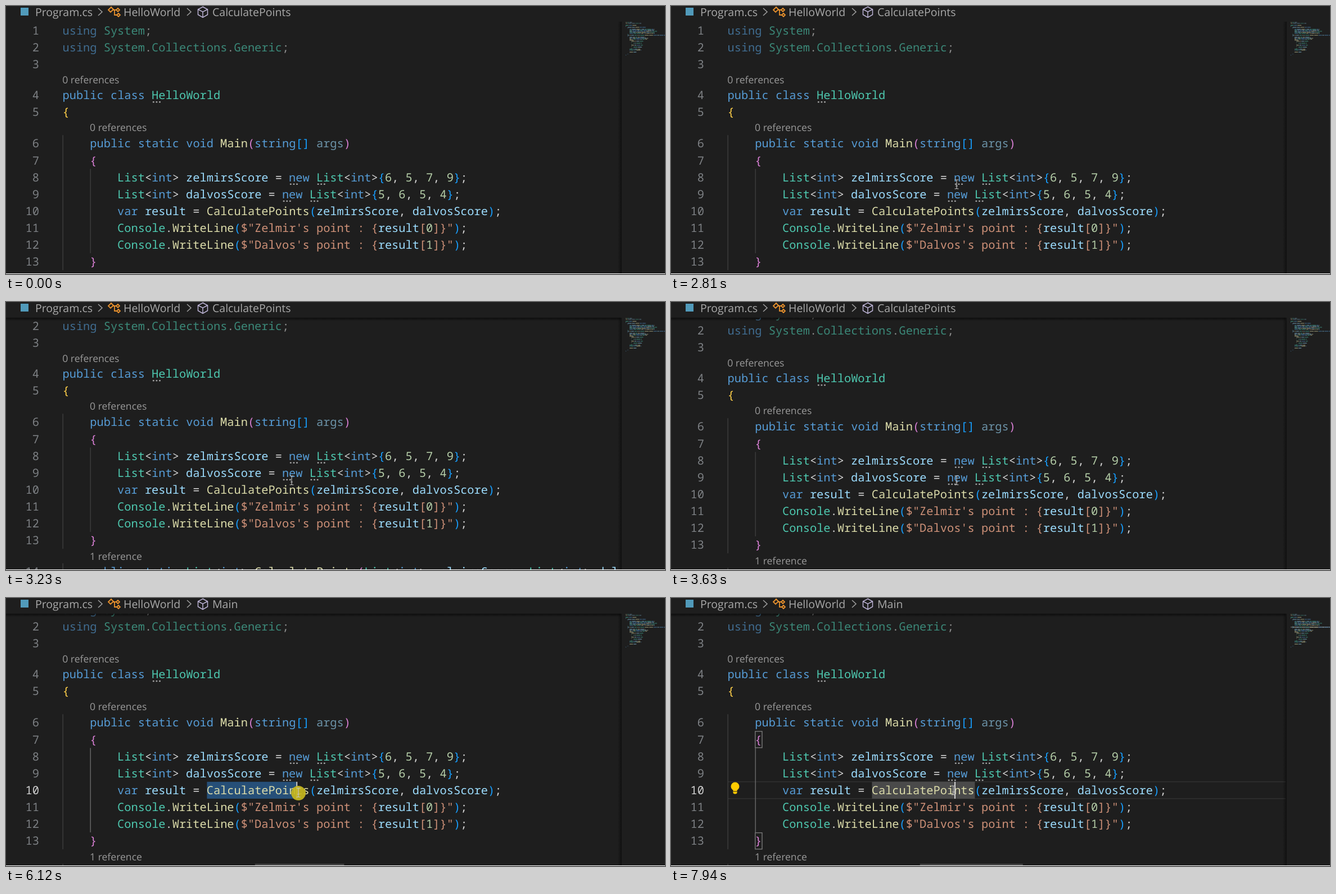
Recreate the animation shown at these times as an HTML page. Size 1172x478 px, loop 8000 ms.

```html
<!DOCTYPE html>
<html lang="en">
<head>
<meta charset="utf-8">
<title>Code editor</title>
<style>
html, body { margin: 0; width: 100%; height: 100%; overflow: hidden; background: #1e1e1e; }
svg { display: block; width: 1172px; height: 478px; }
text { white-space: pre; text-rendering: geometricPrecision; }
.code { font: 20.35px "Noto Sans Mono", monospace; }
.lens { font: 17.6px "Open Sans", sans-serif; fill: #999; }
.crumb { font: 19.5px "Open Sans", sans-serif; fill: #a9a9a9; }
</style>
</head>
<body>
<svg id="stage" viewBox="0 0 1172 478">
  <defs>
    <clipPath id="pane"><rect y="28" width="1093" height="449"/></clipPath>
    <linearGradient id="down" x2="0" y2="1"><stop stop-color="#000" stop-opacity=".55"/><stop offset="1" stop-color="#000" stop-opacity="0"/></linearGradient>
    <linearGradient id="side"><stop stop-color="#000" stop-opacity="0"/><stop offset="1" stop-color="#000" stop-opacity=".45"/></linearGradient>
  </defs>
  <rect width="1172" height="478" fill="#1e1e1e"/>
  <g clip-path="url(#pane)">
    <g id="doc"><g id="back"></g><g id="lines"></g><g id="front"></g></g>
    <rect id="topShade" y="28" width="1093" height="6" fill="url(#down)"/>
  </g>
  <rect x="1088" y="28" width="7" height="449" fill="url(#side)"/>
  <g id="map"></g>
  <g id="crumbs" fill="none" stroke-width="1.5">
    <rect x="26" y="3" width="14" height="14" fill="#519aba"/>
    <path d="M164 4l7 6.5l-7 6.5M322 4l7 6.5l-7 6.5" stroke="#a0a0a0"/>
    <path d="M182 7l5-5 4 4-5 5zM190 7h6M193 7v9h4M196 7l3-3 3 3-3 3zM197 16l3-3 3 3-3 3z" stroke="#e8912d" stroke-width="1.8"/>
    <path d="M350 1.5l8.5 4.5v9.5l-8.5 5-8.5-5V6zM341.5 6l8.5 4.5 8.5-4.5M350 10.5v10" stroke="#bdb4d6"/>
    <text class="crumb" x="52" y="18.3">Program.cs</text>
    <text class="crumb" x="209" y="18.3">HelloWorld</text>
    <text class="crumb" x="367" y="18.3" id="member"></text>
  </g>
  <g id="bulb"><circle cx="114" cy="336" r="7.5" fill="#ffcc00"/><path d="M110.500 341h7v7q-3.500 3-7 0z" fill="#ffcc00"/><path d="M110.500 345h7" stroke="#1e1e1e"/></g>
  <circle id="press" r="13" fill="#c8b81e" fill-opacity=".92"/>
  <path id="beam" d="M-3.500-8h2.500l1 1 1-1h2.500M0-7V7M-3.500 8h2.500l1-1 1 1h2.500M-2 3h4" fill="none" stroke="#c4c4c4" stroke-width="1.100"/>
  <rect y="477" width="1172" height="1" fill="#fff"/>
</svg>
<script>
const $ = id => document.getElementById(id);
const ADV = 12.2, TEXT_X = 100.5, CELL_X = 101.2, ROW = 30.15, LOOP = 8000;
const colX = c => CELL_X + c * ADV;
const midY = n => n < 4 ? 43.3 + ROW * (n - 1) : n < 6 ? 159 + ROW * (n - 4) : n < 14 ? 245.2 + ROW * (n - 6) : 512;

function add(parent, tag, attrs, text) {
  const el = document.createElementNS('http://www.w3.org/2000/svg', tag);
  for (const k in attrs) el.setAttribute(k, attrs[k]);
  if (text) el.textContent = text;
  parent.appendChild(el);
  return el;
}
const set = (el, attrs) => { for (const k in attrs) el.setAttribute(k, attrs[k]); };
const show = (el, on) => el.setAttribute('visibility', on ? 'visible' : 'hidden');

// Upper-case keys are the faded variant of the same colour.
const colors = { b: '#569cd6', t: '#4ec9b0', w: '#d4d4d4', y: '#dcdcaa', v: '#9cdcfe',
  s: '#ce9178', n: '#b5cea8', g: '#ffd04a', p: '#da80d6', c: '#179fff' };
const list = '§tList§w<§bint§w>';
const declare = (name, nums) => `${list} §v${name} §w= §bnew ${list}§c{` +
  nums.map(n => '§n' + n).join('§w, ') + '§c}§w;';
const print = (name, i) => `§tConsole§w.§yWriteLine§c(§s$"${name}'s point : {§vresult§s[§n${i}§s]}"§c)§w;`;
const code = [
  [0, '§Busing §TSystem§W;'],
  [0, '§Busing §TSystem§W.§TCollections§W.§TGeneric§W;'],
  [0, ''],
  [0, '§bpublic class §tHelloWorld'],
  [0, '§g{'],
  [4, '§bpublic static void §yMain§p(§bstring§c[] §Vargs§p)'],
  [4, '§p{'],
  [8, declare('zelmirsScore', [6, 5, 7, 9])],
  [8, declare('dalvosScore', [5, 6, 5, 4])],
  [8, '§bvar §vresult §w= §yCalculatePoints§c(§vzelmirsScore§w, §vdalvosScore§c)§w;'],
  [8, print('Zelmir', 0)],
  [8, print('Dalvos', 1)],
  [4, '§p}'],
  [4, `§bpublic static ${list} §yCalculatePoints§p(${list} §vzelmirsScore§w, ${list} §vdalvosScore§p)`]
];

const back = $('back'), lines = $('lines'), front = $('front');
const rowBox = (n, c, len, fill) => add(back, 'rect',
  { x: colX(c), y: midY(n) - 15, width: len * ADV, height: ROW, fill });

const rowEdge = add(back, 'path', { d: `M101 ${midY(10) - 15}H1093M101 ${midY(10) + 15}H1093`,
  stroke: '#303030', 'stroke-width': 1.5 });
const pick = rowBox(10, 21, 0, '#264f78');
const twin = rowBox(14, 28, 0, '#484848');
const guide = (x, a, b) => add(back, 'path', { d: `M${x} ${midY(a) - 15}V${midY(b) + 15}`,
  stroke: '#404040', 'stroke-width': 1.3 });
guide(101.2, 6, 13);
guide(101.2, 14, 14);
const scope = guide(150.2, 8, 12);

const numbers = code.map(([indent, src], i) => {
  const y = midY(i + 1) + 7.2;
  let col = indent;
  for (const part of src.split('§').slice(1)) {
    const key = part[0], low = key.toLowerCase(), text = part.slice(1);
    add(lines, 'text', { class: 'code', x: TEXT_X + col * ADV, y, fill: colors[low],
      'fill-opacity': key === low ? 1 : .62 }, text);
    col += text.length;
  }
  return add(lines, 'text', { class: 'code', x: 59, y, 'text-anchor': 'end', fill: '#7d8084' }, String(i + 1));
});
[[0, 131.5, '0 references'], [4, 217, '0 references'], [4, 484.5, '1 reference']].forEach(([c, y, s]) =>
  add(lines, 'text', { class: 'lens', x: TEXT_X - .3 + c * ADV, y: y + 6.3 }, s));
[[4, 13], [8, 33], [8, 37], [9, 32], [9, 36]].forEach(([n, c]) => {
  for (let i = 0; i < 3; i++)
    add(lines, 'rect', { x: colX(c) + 1 + i * 5.6, y: midY(n) + 11, width: 3, height: 2.6, rx: 1, fill: '#a2a2a2' });
});

const pairBox = (n, c) => add(front, 'rect', { x: colX(c) - .2, y: midY(n) - 14.5, width: ADV, height: ROW - 1,
  fill: 'none', stroke: '#888', 'stroke-width': 1.2 });
const parens = [pairBox(10, 36), pairBox(10, 62)];
const braces = [pairBox(7, 4), pairBox(13, 4)];
const caret = add(front, 'rect', { y: midY(10) - 15, width: 2, height: ROW, fill: '#d0d0d0' });

// Overview strip: tiny dashes, [line, indent, length] for the part below the visible code.
const map = $('map');
const mapMark = add(map, 'rect', { x: 1102, y: 51, width: 70, height: 1.8, fill: '#575757' });
let seed = 7;
const rnd = () => (seed = seed * 16807 % 2147483647) / 2147483647;
const rows = code.map(([d, s], i) => [i + 1, d, s.replace(/§./g, '').length]);
rows.push([15, 4, 1], [16, 8, 32], [17, 8, 38], [18, 8, 36], [19, 8, 8], [20, 12, 24], [21, 12, 1],
  [22, 16, 17], [23, 12, 1], [24, 12, 24], [25, 12, 1], [26, 16, 17], [27, 12, 1], [28, 8, 23],
  [29, 8, 24], [31, 8, 14], [33, 4, 1], [34, 0, 1]);
const tints = ['#4ec9b0', '#569cd6', '#9cdcfe', '#dcdcaa'];
for (const [n, d, len] of rows) {
  for (let c = 0; c < len;) {
    const w = Math.min(len - c, 2 + Math.floor(rnd() * 7)), x = 1102 + (d + c) * .87;
    if (x < 1172) add(map, 'rect', { x, y: 28.6 + (n - 1) * 1.77, width: Math.min(w * .87, 1172 - x),
      height: 1.1, fill: tints[Math.floor(rnd() * 4)], opacity: n < 3 ? .4 : .6 });
    c += w + 1;
  }
}

// Pointer moves: start, end, number of steps, target x, target y.
const moves = [
  [530, 530, 1, 1046, 462], [600, 600, 1, 820, 352], [660, 660, 1, 732, 340], [730, 730, 1, 811, 421],
  [1790, 2410, 10, 508, 318],
  [4350, 4620, 5, 538, 353], [4690, 5110, 7, 371, 343],
  [5180, 5460, 5, 360, 343],
  [5800, 6120, 5, 520, 347], [6190, 6460, 5, 537, 346],
  [6870, 7130, 5, 510, 345], [7400, 7540, 3, 502, 343]
];
const scrolls = [[3030, 12], [3100, 23], [3170, 28], [3230, 31], [3500, 29], [3570, 25], [3630, 23]];

function stepped(t, a, b, n) {
  if (t >= b) return 1;
  return (Math.floor((t - a) / (b - a) * (n - 1) + .1) + 1) / n;
}
function pointer(t) {
  let x = 1046, y = 462;
  for (const [a, b, n, tx, ty] of moves) {
    if (t < a) break;
    const p = stepped(t, a, b, n), k = p * p * (3 - 2 * p);
    x += (tx - x) * k;
    y += (ty - y) * k;
  }
  return [x, y];
}

function draw(t) {
  const [x, y] = pointer(t);
  const scroll = scrolls.reduce((s, [at, v]) => t >= at ? v : s, 0);
  const active = t >= 5660, clicked = t >= 7330;
  const end = clicked ? 36 : active ? Math.max(21, Math.min(36, Math.round((pointer(Math.min(t, 6530))[0] - CELL_X) / ADV))) : 21;

  set($('doc'), { transform: `translate(0 ${-scroll})` });
  show($('topShade'), scroll > 0);
  $('member').textContent = active ? 'Main' : 'CalculatePoints';
  set(numbers[9], { fill: active ? '#d0d0d0' : '#7d8084' });
  set(scope, { stroke: active ? '#707070' : '#404040' });

  const width = (end - 21) * ADV;
  set(pick, { width, fill: clicked ? '#4a4a4a' : '#264f78' });
  set(twin, { width });
  set(caret, { x: colX(clicked ? 33 : end) + .2 });
  show(caret, active);
  show(rowEdge, clicked);
  show(mapMark, t >= 6460);
  parens.forEach(el => show(el, t >= 6800 && !clicked));
  braces.forEach(el => show(el, clicked));
  show($('bulb'), t >= 6800);

  set($('beam'), { transform: `translate(${x} ${y})` });
  show($('beam'), t >= 530);
  set($('press'), { cx: x, cy: y + 1 });
  show($('press'), active && t < 6530 || clicked && t < 7540);
}

const start = performance.now();
function tick() {
  draw((performance.now() - start) % LOOP);
  requestAnimationFrame(tick);
}
tick();
</script>
</body>
</html>
```
